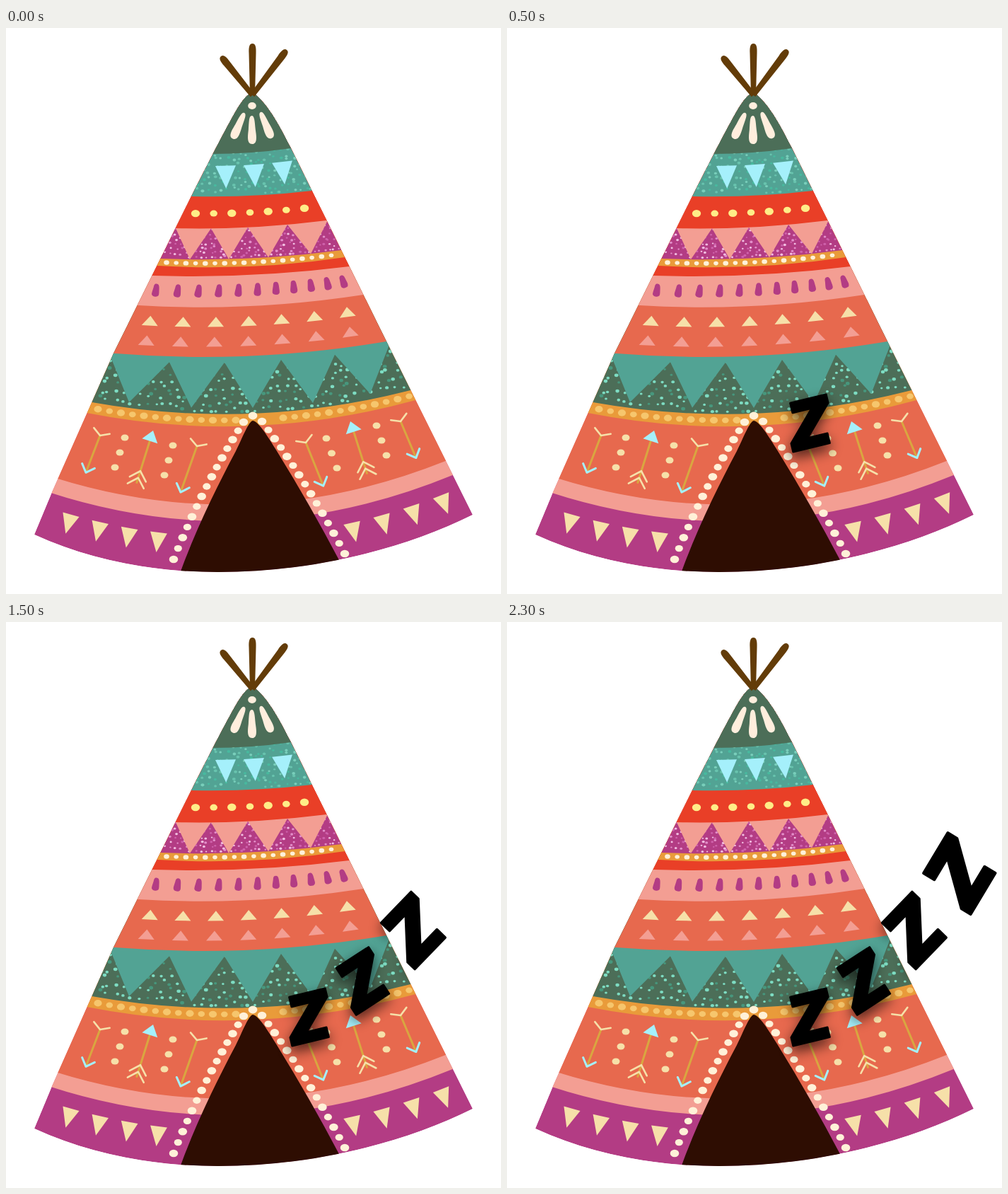
An HTML page that plays this animation: 700x800 px, repeating every 2500 ms.

```html
<!DOCTYPE html>
<html lang="en">
<head>
<meta charset="utf-8">
<title>Sleepy tent</title>
<style>
html, body { margin: 0; width: 100%; height: 100%; overflow: hidden; background: #fff; }
svg { display: block; width: 100vw; height: 100vh; }
</style>
</head>
<body>
<svg id="stage" viewBox="0 0 700 800" xmlns="http://www.w3.org/2000/svg"></svg>
<script>
const LOOP = 2500, STEP = 500;
const C = {
  moss: '#4c6e58', teal: '#52a394', red: '#e93f27', pink: '#f39e93', gold: '#e99b3a',
  coral: '#e7694e', plum: '#b33c84', cream: '#f6e0a9', pale: '#fff1d8', ice: '#a5f0fb',
  wood: '#633c08', night: '#2e0d02', shaft: '#d9a640', lemon: '#ffed87', honey: '#f6c66d'
};
const TENT = 'M349 91C338 94 328 112 318 130C300 163 290 183 262 238L152 460L65 656L40 716' +
  'C120 752 205 769 300 769C430 769 560 738 660 688L538 443L403 170C390 145 372 108 349 91Z';

// bands from the top: colour, then left y, right y and sag of the lower edge
const bands = [
  [C.moss, 178, 170, 2], [C.teal, 238, 230, 3], [C.red, 283, 272, 4], [C.plum, 326, 314, 5.5],
  [C.gold, 336, 324, 7], [C.red, 350, 337, 5.5], [C.pink, 392, 377, 8.5], [C.coral, 460, 443, 12],
  [C.moss, 529, 512, 24.5], [C.gold, 544, 526, 27.5], [C.coral, 636, 612, 49], [C.pink, 656, 632, 52.5]
].map(([fill, l, r, sag]) => ({ fill, l, r, sag, x0: 262 - (l - 238) * .483, x1: 403 + (r - 170) * .4945 }));

let seed = 11;
const rnd = () => (seed = (seed * 16807) % 2147483647) / 2147483647;
const mix = (a, b, t) => a + (b - a) * t;
const repeat = (n, fn) => Array.from({ length: n }, (_, i) => fn(i)).join('');

const path = (d, fill) => `<path d="${d}" fill="${fill}"/>`;
const line = (d, color, w) =>
  `<path d="${d}" fill="none" stroke="${color}" stroke-width="${w}" stroke-linecap="round" stroke-linejoin="round"/>`;
const dot = (x, y, r, fill) =>
  `<ellipse cx="${x.toFixed(1)}" cy="${y.toFixed(1)}" rx="${(r * 1.07).toFixed(1)}" ry="${(r * .9).toFixed(1)}" fill="${fill}"/>`;
const place = (x, y, turn, art) =>
  `<g transform="translate(${x.toFixed(1)} ${y.toFixed(1)}) rotate(${turn.toFixed(1)})">${art}</g>`;

function edgeY(i, x) {
  const b = bands[i], t = (x - b.x0) / (b.x1 - b.x0);
  return mix(b.l, b.r, t) + 4 * t * (1 - t) * b.sag;
}
const inside = (i, f) => x => mix(edgeY(i - 1, x), edgeY(i, x), f);

function fillBand({ fill, l, r, sag, x0, x1 }) {
  return path(`M0 0V${l}H${x0}Q${(x0 + x1) / 2} ${(l + r) / 2 + 2 * sag} ${x1} ${r}H700V0Z`, fill);
}

// evenly spaced items that follow a curve; bend pushes the middle ones along
const row = (n, x0, x1, yAt, item, bend = 0) => repeat(n, i => {
  const x = mix(x0, x1, i / (n - 1)) + bend * i * (n - 1 - i);
  const slope = Math.atan((yAt(x + 2) - yAt(x - 2)) / 4) * 180 / Math.PI;
  return item(x, yAt(x), slope, i);
});
const bead = (r, fill) => (x, y, turn, i) => dot(x, y, i % 2 ? r * .9 : r * 1.05, fill);
const peak = fill => (x, y, turn) => place(x, y, turn, path('M1 -8L12 6L-11 6Z', fill));
const flag = (w, h, fill) => (x, y, turn) => place(x, y, turn, path(`M${-w / 2} 0H${w / 2}L0 ${h}Z`, fill));
const drop = (x, y, turn, i) => place(x, y, 10 - i * i * .28,
  path('M-2 -9Q3 -11 4 -4L5 3Q6 9 0 9Q-6 9 -5 3L-4 -4Q-4 -8 -2 -9Z', C.plum));

function specks(i, gap, size, colors) {
  let s = '';
  for (let x = bands[i].x0; x < bands[i].x1; x += gap)
    for (let y = edgeY(i - 1, x); y < edgeY(i, x) - size; y += gap) {
      const px = x + (rnd() - .5) * gap * .8, py = y + (rnd() - .5) * gap * .8;
      s += dot(px, Math.min(py, edgeY(i, px) - size - 1), size * (.65 + rnd() * .5),
        colors[Math.floor(rnd() * colors.length)]);
    }
  return s;
}

// colour above a zigzag that swings between the two edges of a band
function zigzag(i, xs, inset, fill) {
  const pts = xs.map((x, n) => `${x} ${n % 2 ? edgeY(i, x) - inset : edgeY(i - 1, x) + inset}`);
  return path(`M${xs[0]} ${bands[i - 1].r - 40}L${pts.join('L')}V${bands[i - 1].r - 40}Z`, fill);
}

const arrow = (x, y, turn, len) => place(x, y, turn,
  line(`M0 0V${len}`, C.shaft, 3) + line('M-12 -7L0 0L12 -7', C.cream, 2.6) +
  line(`M-9.500 ${len - 10}L0 ${len}L9.500 ${len - 10}`, C.ice, 3));
const feathered = (x, y, turn) => place(x, y, turn,
  line('M0 15V77', C.shaft, 3) + path('M0 0L11.500 15.500H-11.500Z', C.ice) +
  line('M-12 72L0 60L12 72M-12 82L0 70L12 82', C.cream, 2.6));
const column = (x, y, dx) => repeat(3, i => dot(x + dx * i, y + 21 * i, 5.1, C.cream));

const decor = {
  1: () => specks(1, 8.5, 2, ['#79cfbb', '#48b99f', '#68c3ae']) +
    row(3, 310.5, 390.5, inside(1, .28), flag(29, 32, C.ice)),
  2: () => row(7, 268, 422, inside(2, .53), bead(5.5, C.lemon)),
  3: () => specks(3, 7, 1.7, ['#f2bfe2', '#e38fca', '#cf62ac']) +
    zigzag(3, [240, 260, 290, 315, 342, 371, 398, 431, 455], 0, C.pink),
  4: () => row(18, 227, 460, inside(4, .5), bead(3.4, C.pale)),
  6: () => row(11, 212, 477, inside(6, .48), drop, .45),
  7: () => row(7, 203, 482, inside(7, .31), peak(C.cream)) + row(7, 198, 486, inside(7, .71), peak(C.pink)),
  8: () => specks(8, 11, 2.4, ['#7ddcc2', '#7ddcc2', '#47977d']) +
    zigzag(8, [149, 174, 231, 262, 309, 349, 389, 434, 465, 515, 541], 8, C.teal),
  9: () => row(13, 130, 325, inside(9, .5), bead(5, C.honey)) + row(12, 392, 570, inside(9, .5), bead(5, C.honey)),
  10: () => arrow(133, 576, 21, 56) + feathered(208, 569, 17.5) + arrow(270, 591, 19.5, 69) +
    arrow(424, 586, -22, 66) + feathered(487, 556, -17.7) + arrow(558, 556, -23, 56) +
    column(168, 579, -7) + column(236, 590, -6) + column(453, 580, 7.5) + column(524, 562, 7)
};

// dots on a quadratic curve beside the door
const trim = (ax, ay, bx, by, cx, cy) => repeat(15, i => {
  const t = i / 14, q = (a, b, c) => mix(mix(a, b, t), mix(b, c, t), t);
  return dot(q(ax, bx, cx), q(ay, by, cy), i % 2 ? 5.2 : 5.9, C.pale);
});
const door = () =>
  path('M349 555C343 556 335 578 325 598C300 645 270 705 247 768L240 785H485L471 752' +
    'Q430 674 383 598C370 577 357 556 349 555Z', C.night) +
  trim(336, 557, 281, 642, 237, 751) + trim(362, 556, 425, 640, 479, 743) + dot(349, 548, 6, C.pale);

const petal = (x, y, turn) => place(x, y, turn,
  path('M0 0C4 0 4 8 5 20C6 28 8 40 0 40C-8 40 -6 28 -5 20C-4 8 -4 0 0 0Z', '#ffeedd'));
const crown = () => dot(348, 110, 5.4, '#ffeedd') + petal(337, 120, 24) + petal(347.5, 124, -1) + petal(360, 119, -23);

function pole(x, y) {
  const dx = 348.5 - x, dy = 95 - y, len = Math.hypot(dx, dy);
  return place(x, y, -Math.atan2(dx, dy) * 180 / Math.PI,
    path(`M0 0C4 0 5.500 4 5 14L3.500 ${len}H-3.500L-5 14C-5.500 4 -4 0 0 0Z`, C.wood));
}

function tent() {
  const hem = x => edgeY(11, x) + 22;
  let s = path(TENT, C.plum);
  for (let i = bands.length - 1; i >= 0; i--) s += fillBand(bands[i]) + (decor[i] ? decor[i]() : '');
  s += row(4, 92, 216, hem, flag(24, 28, C.cream)) + row(4, 489, 615, hem, flag(24, 28, C.cream));
  return `<g clip-path="url(#tent)">${s + door() + crown()}</g>`;
}

function zee(x, y, turn, size) {
  const use = `<use href="#z" transform="translate(${x} ${y}) rotate(${turn}) scale(${size})"/>`;
  return `<g class="zee"><g clip-path="url(#tent)"><g transform="translate(0 8)" filter="url(#soft)" opacity=".65">${use}</g></g>${use}</g>`;
}

const stage = document.getElementById('stage');
stage.innerHTML = `<defs><clipPath id="tent"><path d="${TENT}"/></clipPath>` +
  '<filter id="soft" x="-50%" y="-50%" width="200%" height="200%"><feGaussianBlur stdDeviation="9"/></filter>' +
  '<path id="z" d="M-20 -34H32V-22L-8 20H21V34H-32V22L8 -20H-20Z" stroke="#000" stroke-width="3" stroke-linejoin="round"/></defs>' +
  '<rect width="700" height="800" fill="#fff"/>' + tent() +
  pole(304, 40) + pole(348.5, 22) + pole(397, 31) +
  zee(428, 558.5, -13.5, 1) + zee(504, 507.5, -33, 1.04) + zee(575.5, 436, -46, 1.17) + zee(639.5, 355.5, -59, 1.28);

const letters = stage.querySelectorAll('.zee');
function draw(ms) {
  const shown = Math.floor((ms % LOOP) / STEP);
  letters.forEach((z, i) => z.setAttribute('visibility', i < shown ? 'visible' : 'hidden'));
}

let start = null;
function tick(now) {
  if (start === null) start = now;
  draw(now - start);
  requestAnimationFrame(tick);
}
draw(0);
requestAnimationFrame(tick);
</script>
</body>
</html>
```
